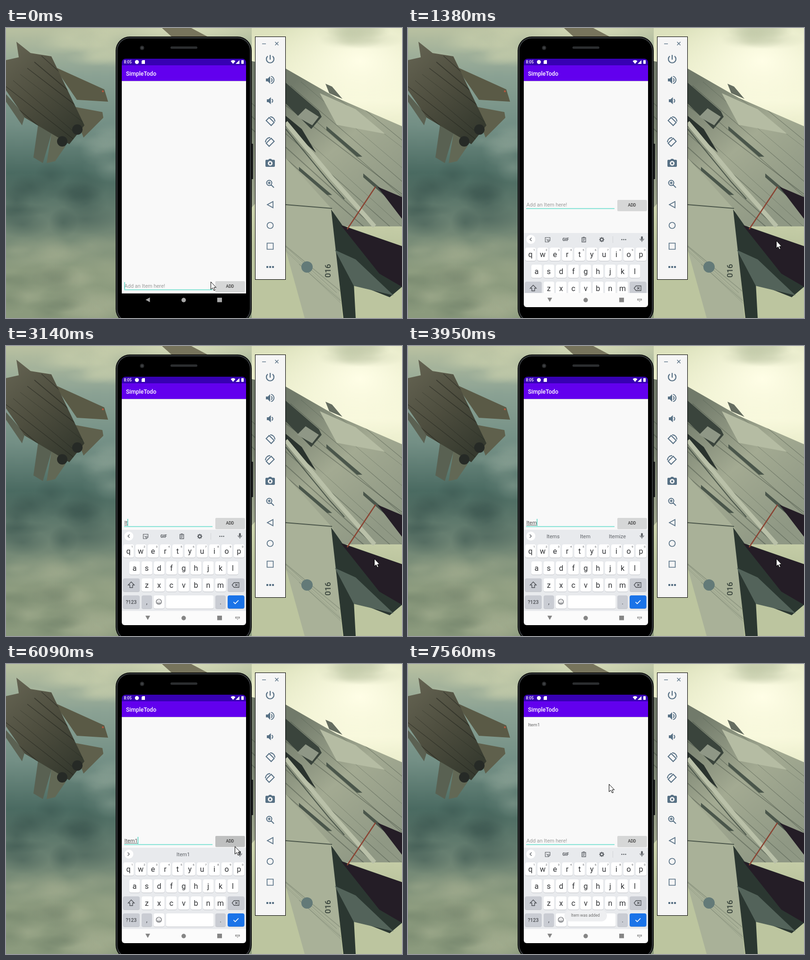
An HTML page with a canvas that plays this animation: 838x614 px, repeating every 8000 ms.

```html
<!DOCTYPE html>
<html lang="en">
<head>
<meta charset="utf-8">
<title>Todo app demo</title>
<style>
  html, body { margin: 0; width: 100%; height: 100%; overflow: hidden; background: #6f8a80; }
  canvas { display: block; }
</style>
</head>
<body>
<canvas id="stage" width="838" height="614"></canvas>
<script>
const W = 838, H = 614, LOOP = 8000;
const WORD = 'Item1', KEY_TIMES = [2760, 3140, 3280, 3680, 4350];
const KEYBOARD_IN = 1380, KEYBOARD_SET = 1530, TYPING_END = 4760;
const PRESS = 6050, CLEARED = 6220, ADDED = 6370, TOAST = 6500, SUGGEST_END = 6620;
const STEP = 130; // the pointer is refreshed at this interval
const PATH = [
  [0, 433, 537], [260, 365, 539], [910, 365, 539], [1170, 758, 467], [1300, 779, 450],
  [4810, 779, 450], [4940, 675, 360], [5070, 675, 360], [5200, 603, 259],
  [5720, 482, 386], [6240, 486, 386], [6500, 486, 327], [6890, 425, 254]
];
const stage = document.getElementById('stage').getContext('2d');
let c = stage;

// State as a function of time
function pointerAt(t) {
  const s = Math.floor(t / STEP) * STEP;
  const i = PATH.findIndex(p => p[0] > s);
  if (i < 0) return PATH[PATH.length - 1].slice(1);
  const [t0, x0, y0] = PATH[i - 1], [t1, x1, y1] = PATH[i];
  const k = (s - t0) / (t1 - t0);
  return [Math.round(x0 + (x1 - x0) * k), Math.round(y0 + (y1 - y0) * k)];
}
function typedAt(t) {
  return t < CLEARED ? WORD.slice(0, KEY_TIMES.filter(k => k <= t).length) : '';
}
function caretAt(t) {
  if (t >= KEY_TIMES[0] && t < TYPING_END) return true;
  const since = t >= PRESS ? t - PRESS : t + 240;
  return since % 1000 < 500;
}
function suggestionsAt(t) {
  const typed = typedAt(Math.min(t, PRESS) - 120);
  if (typed.length < 3 || t >= SUGGEST_END) return [];
  return typed === WORD ? ['', typed, ''] : ['Items', typed, 'Itemize'];
}

// Drawing helpers
function rect(x, y, w, h, fill) {
  c.fillStyle = fill;
  c.fillRect(x, y, w, h);
}
function round(x, y, w, h, r, fill) {
  c.beginPath();
  c.roundRect(x, y, w, h, r);
  c.fillStyle = fill;
  c.fill();
}
function dot(x, y, r, fill) {
  c.beginPath();
  c.arc(x, y, r, 0, 7);
  c.fillStyle = fill;
  c.fill();
}
function trace(p) {
  c.beginPath();
  for (let i = 0; i < p.length; i += 2) c.lineTo(p[i], p[i + 1]);
}
function poly(fill, ...p) {
  trace(p);
  c.closePath();
  c.fillStyle = fill;
  c.fill();
}
function line(color, width, ...p) {
  trace(p);
  c.strokeStyle = color;
  c.lineWidth = width;
  c.stroke();
}
function text(s, x, y, size, fill, align = 'left', weight = 400) {
  c.font = `${weight} ${size}px Roboto, sans-serif`;
  c.textAlign = align;
  c.fillStyle = fill;
  c.fillText(s, x, y);
}
// Icon path in units around its own centre; a width strokes it
function icon(x, y, d, color, width = 0, angle = 0) {
  c.save();
  c.translate(x, y);
  c.rotate(angle);
  const p = new Path2D(d);
  c.fillStyle = c.strokeStyle = color;
  c.lineWidth = width;
  if (width) c.stroke(p); else c.fill(p, 'evenodd');
  c.restore();
}
function glow(x, y, rx, ry, rgb, alpha) {
  c.save();
  c.translate(x, y);
  c.scale(rx, ry);
  const g = c.createRadialGradient(0, 0, 0, 0, 0, 1);
  g.addColorStop(0, `rgba(${rgb},${alpha})`);
  g.addColorStop(1, `rgba(${rgb},0)`);
  rect(-1, -1, 2, 2, g);
  c.restore();
}
function fade(x0, y0, x1, y1, ...colors) {
  const g = c.createLinearGradient(x0, y0, x1, y1);
  colors.forEach((col, i) => g.addColorStop(i / (colors.length - 1), col));
  return g;
}
let seed = 7;
function random(min, max) {
  seed = (seed * 16807) % 2147483647;
  return min + (max - min) * seed / 2147483647;
}
function clouds(count, x0, x1, y0, y1, rgb, alpha) {
  for (let i = 0; i < count; i++) {
    glow(random(x0, x1), random(y0, y1), random(30, 75), random(14, 34), rgb, alpha);
  }
}
// Fine parallel panel lines kept inside the last traced shape
function panels(count, x, y, dx, dy, len, color) {
  c.save();
  c.clip();
  for (let i = 0; i < count; i++) {
    const px = x + dx * i, py = y + dy * i, slope = random(0.75, 0.95);
    line(color, random(0.6, 2), px, py, px + len, py + len * slope);
  }
  c.restore();
}

function drawSky() {
  rect(0, 0, 520, H, fade(0, 0, 0, H, '#b9c1a1', '#8aa193', '#738f85', '#4a6a61', '#6a8172', '#8d9c7f', '#8b9a7d'));
  rect(520, 0, 318, H, fade(0, 0, 0, H, '#dde2bd', '#f5f6d8', '#dbe0ba', '#bcc59f', '#bcc59f'));
  glow(380, 0, 200, 50, '214,219,184', 1);
  clouds(16, 60, 240, 0, 70, '200,207,172', 0.4);
  clouds(12, 150, 240, 190, 310, '140,163,150', 0.35);
  clouds(14, 0, 190, 310, 420, '56,82,76', 0.4);
  clouds(36, 0, 240, 455, 614, '164,174,144', 0.32);
  clouds(10, 0, 130, 520, 614, '100,118,96', 0.3);
  glow(750, 70, 190, 130, '255,254,230', 1);
  clouds(8, 592, 780, 0, 30, '190,198,165', 0.4);
}

function drawLeftJet() {
  poly('#5b6152', 0, 140, 40, 186, 34, 206, 0, 156);
  poly('#596152', 70, 190, 58, 274, 78, 286, 98, 218);
  poly('#626855', 98, 212, 126, 250, 104, 282, 86, 286);
  poly('#5a5a46', 102, 82, 208, 130, 216, 156, 150, 152);
  poly('#5f604c', 140, 166, 204, 178, 206, 190, 164, 232);
  poly(fade(0, 60, 140, 220, '#626150', '#4d4d3e', '#363a2f'),
    22, 29, 52, 53, 96, 60, 166, 206, 134, 246, 40, 190, 0, 132, 0, 68, 27, 62);
  panels(9, -30, 150, 15, -13, 190, 'rgba(20,24,18,.45)');
  dot(119, 240, 11, '#262a26');
  dot(151, 215, 11, '#262a26');
  dot(205, 134, 2, '#b5573f');
}

function drawRightJet() {
  poly('#77745c', 330, 0, 392, 0, 426, 18, 350, 18);
  poly('#656d60', 676, 118, 690, 124, 712, 150, 684, 138);
  // Hull, lit ridge and tail
  poly(fade(592, 130, 800, 380, '#717a6a', '#a3aa92', '#8f9884'),
    520, 70, 592, 86, 700, 148, 838, 208, 838, 420, 710, 420, 592, 300, 520, 380);
  panels(14, 470, 170, 22, -8, 330, 'rgba(55,66,56,.4)');
  poly('#b5bca3', 664, 138, 740, 172, 802, 224, 700, 205);
  poly('#a9b198', 592, 275, 692, 386, 712, 614, 632, 614, 592, 470);
  panels(5, 500, 380, 30, 30, 200, 'rgba(70,82,68,.25)');
  poly('#3a443c', 592, 116, 662, 176, 668, 188, 646, 214, 592, 160);
  poly('#8f9786', 634, 170, 662, 188, 648, 206, 616, 188);
  poly('#2a332e', 592, 186, 626, 214, 656, 264, 592, 208);
  for (const [x, y, len] of [[678, 208, 76], [756, 308, 74], [620, 294, 70]]) {
    poly('#4a564b', x, y, x + len, y + len * 0.85, x + len * 0.85, y + len * 0.85, x, y + 8);
  }
  line('#b9c0a8', 9, 592, 200, 690, 318, 780, 420);
  line('#4f5a4e', 2, 592, 214, 684, 326, 716, 362);
  line('#4c574b', 2, 592, 374, 690, 382);
  // Engine
  poly('#2b3731', 688, 384, 712, 418, 838, 462, 838, 548, 812, 570, 736, 540, 740, 614, 714, 614);
  poly('#53635a', 696, 470, 740, 490, 820, 566, 736, 546);
  poly('#241d26', 709, 418, 838, 462, 838, 548, 790, 520);
  poly('#241d26', 786, 336, 838, 358, 838, 404);
  line('#8a4433', 2.5, 782, 336, 722, 426);
  dot(637, 506, 12, '#637a78');
  c.save();
  c.translate(687, 514);
  c.rotate(-Math.PI / 2);
  text('016', 0, 0, 17, '#39443d', 'center', 500);
  c.restore();
}

function drawPhone() {
  round(519, 245, 4, 75, 1, '#1b1d1e');
  const shells = ['#0a0b0b', '#0a0b0b', '#484c4f', '#2c2f31', '#000'];
  shells.forEach((fill, i) => round(232 + i, 18 + i, 288 - 2 * i, 607 - 2 * i, 30 - i, fill));
  dot(288, 42, 4.5, '#2b2c2e');
  dot(288, 42, 2, '#44474a');
  round(348, 39, 57, 5, 2.5, '#2b2d2f');
}

function drawSidePanel() {
  const ink = '#587185';
  rect(527, 18, 65, 515, '#000');
  rect(528, 19, 63, 513, '#f5f5f5');
  line(ink, 1.3, 542, 33.5, 550, 33.5);
  icon(573, 33, 'M-3.5-3.5L3.5 3.5M3.5-3.5L-3.5 3.5', ink, 1.4);
  const speaker = 'M-9-3V3H-5L0 8V-8L-5-3Z';
  const rotated = 'M-4.5-7.5H4.5V7.5H-4.5Z';
  // Evenly spaced buttons; each is a list of [path, stroke width, angle]
  const buttons = [
    [['M0-9V1M-5-6.5A8 8 0 1 0 5-6.5', 2.2]],
    [[speaker], ['M2-3.5A4 4 0 0 1 2 3.5M2-7.6A7.8 7.8 0 0 1 2 7.6', 2]],
    [['M-7-3V3H-3.5L1.5 7.5V-7.5L-3.5-3Z'], ['M3.5-3.5A4 4 0 0 1 3.5 3.5', 2]],
    [[rotated, 2, -Math.PI / 4], ['M10 0A10 10 0 0 0 0-10', 1.8]],
    [[rotated, 2, Math.PI / 4], ['M-10 0A10 10 0 0 1 0-10', 1.8]],
    [['M-8-7H-4L-2-9H2L4-7H8Q10-7 10-5V6Q10 8 8 8H-8Q-10 8-10 6V-5Q-10-7-8-7ZM0-4.5A5 5 0 1 0 .1-4.5Z'],
      ['M-2 .5H2', 4]],
    [['M-7.5-2A5.5 5.5 0 1 0 3.5-2A5.5 5.5 0 1 0-7.5-2M2 2L8 8M-5-2H1M-2-5V1', 1.9]],
    [['M-6 0L6-6.5V6.5Z', 1.7]],
    [['M-6.5 0A6.5 6.5 0 1 0 6.5 0A6.5 6.5 0 1 0-6.5 0', 1.7]],
    [['M-6.5-6.5H6.5V6.5H-6.5Z', 1.6]],
    [['M-8-2H-4V2H-8ZM-2-2H2V2H-2ZM4-2H8V2H4Z']]
  ];
  buttons.forEach((parts, i) => {
    for (const [d, width, angle] of parts) icon(559, 66 + 44 * i, d, ink, width, angle);
  });
}

function drawAppBar() {
  round(245, 65, 263, 20, [8, 8, 0, 0], '#3700b3');
  text('8:05', 249.5, 75, 8.3, '#fff', 'left', 500);
  dot(277, 72, 4.2, '#fff');
  poly('#fff', 287, 70, 289, 68, 294, 68, 294, 76, 287, 76);
  icon(480.5, 76, 'M0 0L-5-6Q0-10 5-6Z', '#fff');
  poly('#fff', 486, 76, 494, 68, 494, 76);
  round(498, 68, 5, 8, 1, '#fff');
  rect(245, 79, 263, 33, '#6200ee');
  text('SimpleTodo', 254, 101, 12.1, '#fff', 'left', 500);
}

// Everything that never changes is painted once.
const backdrop = document.createElement('canvas');
backdrop.width = W;
backdrop.height = H;
c = backdrop.getContext('2d');
drawSky();
drawLeftJet();
drawRightJet();
drawPhone();
drawSidePanel();
drawAppBar();
c = stage;

function drawInput(t, top) {
  const typed = typedAt(t), base = top + 13.5;
  let caretX = 250.5;
  if (typed) {
    text(typed, 250.5, base, 11, '#4a4a4a');
    const w = c.measureText(typed).width;
    rect(250.5, base + 1.5, w, 1, '#666');
    caretX += w;
  } else {
    text('Add an Item here!', 250.5, base, 11, '#9b9b9b');
  }
  if (caretAt(t)) rect(caretX, top + 2, 1.2, 15, '#35c9b6');
  rect(250, top + 17.5, 187, 1.7, '#74dfd0');
  round(443, top + 1, 62.5, 23, 2, 'rgba(0,0,0,.12)');
  round(443, top, 62.5, 23, 2, t >= PRESS && t < ADDED ? '#bfc0c0' : '#d6d7d7');
  text('ADD', 474, top + 14, 8.6, '#333', 'center', 500);
}

function drawNav(t, open) {
  const ink = open ? '#858585' : '#a8a8a8';
  if (open) round(245, 561, 263, 30, [0, 0, 6, 6], '#fbfbfb');
  icon(300, 575.5, 'M-5-4.5H5L0 4.5Z', ink, 0, open ? 0 : Math.PI / 2);
  dot(376, 576, 4.7, ink);
  rect(447, 571, 10, 9.5, ink);
  if (t >= 960) icon(490, 576, 'M-5-3H5V1H-5ZM-3-1.5V-.5H3V-1.5ZM-2 2H2L0 4Z', open ? '#a5a5a5' : '#8a8a8a');
}

function key(x, y, w, fill = '#fff') {
  round(x, y + 1, w, 28, 4, '#c3c5ca');
  round(x, y, w, 28, 4, fill);
}
function keyRow(letters, x, y, digits) {
  [...letters].forEach((ch, i) => {
    const mid = x + i * 26;
    key(mid - 11, y, 22.5);
    text(ch, mid, y + 19.5, 16, '#2f3134', 'center');
    if (digits) text((i + 1) % 10, mid + 8, y + 7, 6, '#55585c', 'center');
  });
}

function drawToolbar(t) {
  const ink = '#5f6368', words = suggestionsAt(t);
  dot(260, 402.5, 9.5, '#fff');
  icon(259.5, 402.5, 'M2-3.5L-1.5 0L2 3.5', ink, 1.4, words.length ? Math.PI : 0);
  icon(495, 402, 'M-2-4A2 2 0 0 1 2-4V0A2 2 0 0 1-2 0Z', ink);
  icon(495, 402, 'M-4-1A4 4 0 0 0 4-1M0 3V6', ink, 1.2);
  if (words.length) {
    words.forEach((w, i) => text(w, 307 + i * 68, 407, 11, ink, 'center'));
    return;
  }
  icon(295.5, 403, 'M-5-4.5H5V2L2 5H-5ZM5 1H1V5M-2.5 0Q-1 2 1 0M-2.5-2H-1.5M1.5-2H2.5', ink, 1.2);
  text('GIF', 333.5, 406, 8.8, ink, 'center', 900);
  icon(372, 403, 'M-4-4H4V5H-4ZM-2.5-1H2.5M-2.5 2H1.5M-2-5H2', ink, 1.3);
  icon(410, 403, 'M-3 0A3 3 0 1 0 3 0A3 3 0 1 0-3 0', ink, 2);
  for (let i = 0; i < 8; i++) icon(410, 403, 'M-1-5.3H1V-3H-1Z', ink, 0, i * Math.PI / 4);
  rect(433, 396, 1, 14, '#d2d4d8');
  for (let i = -1; i < 2; i++) dot(456.5 + 4 * i, 403, 1.3, ink);
}

function drawKeyboard(t) {
  const grey = '#c9ccd3', ink = '#4b4e53';
  rect(245, 389, 263, 172, '#e8eaed');
  drawToolbar(t);
  keyRow('qwertyuiop', 259, 420, true);
  keyRow('asdfghjkl', 272, 456);
  keyRow('zxcvbnm', 298, 492);
  for (const y of [492, 528]) {
    key(247.5, y, 35.5, grey);
    key(469, y, 35.5, y > 500 ? '#1a73e8' : grey);
  }
  icon(265, 506, 'M0-6.5L6.5 0H3V5.5H-3V0H-6.5Z', ink, 1.3);
  icon(486, 506, 'M-7.5 0L-3.5-5H7V5H-3.5ZM-1-2.3L4 2.3M4-2.3L-1 2.3', ink, 1.3);
  text('?123', 265, 546, 10.5, ink, 'center', 500);
  for (const [ch, x] of [[',', 298], ['.', 454]]) {
    key(x - 11, 528, 22, grey);
    text(ch, x, 547, 14, ink, 'center');
  }
  key(312.5, 528, 22.5);
  icon(323.5, 541.5, 'M-5.5 0A5.5 5.5 0 1 0 5.5 0A5.5 5.5 0 1 0-5.5 0M-3 1.5Q0 5 3 1.5M-2.5-1.5H-1M1-1.5H2.5', ink, 1.2);
  key(338.5, 528, 101);
  icon(486.5, 542, 'M-5 0L-1.5 3.5L5.5-3.5', '#fff', 1.6);
}

function drawToast() {
  round(331, 521, 90, 24, 12, '#eeeff1');
  text('Item was added', 345, 535, 8.6, '#707070');
}

function drawPointer(t) {
  const [x, y] = pointerAt(t);
  const arrow = 'M0 0V16L3.7 12.6L6.2 18H8.6V16.8L6.5 11.8H11.2Z';
  icon(x + 0.5, y + 0.5, arrow, '#fff');
  icon(x + 0.5, y + 0.5, arrow, '#000', 1);
  if (t >= ADDED && t < SUGGEST_END) {
    dot(x + 13.3, y - 0.5, 7.5, '#1e90ee');
    dot(x + 13.3, y - 0.5, 3.8, '#fff');
  }
}

function draw(t) {
  const open = t >= KEYBOARD_IN;
  c.drawImage(backdrop, 0, 0);
  rect(245, 112, 263, 450, '#f9f9f9');
  rect(245, 112, 263, 1, '#c9c5d2');
  if (t >= ADDED) text(WORD, 254, 131.5, 9.8, '#666');
  drawInput(t, open ? 364 : 536);
  if (open) {
    c.save();
    c.beginPath();
    c.rect(245, 389, 263, 172);
    c.clip();
    if (t < KEYBOARD_SET) c.translate(0, 45);
    drawKeyboard(t);
    if (t >= TOAST) drawToast();
    c.restore();
  }
  drawNav(t, open);
  drawPointer(t);
}

const start = performance.now();
function tick() {
  draw((performance.now() - start) % LOOP);
  requestAnimationFrame(tick);
}
tick();
</script>
</body>
</html>
```
